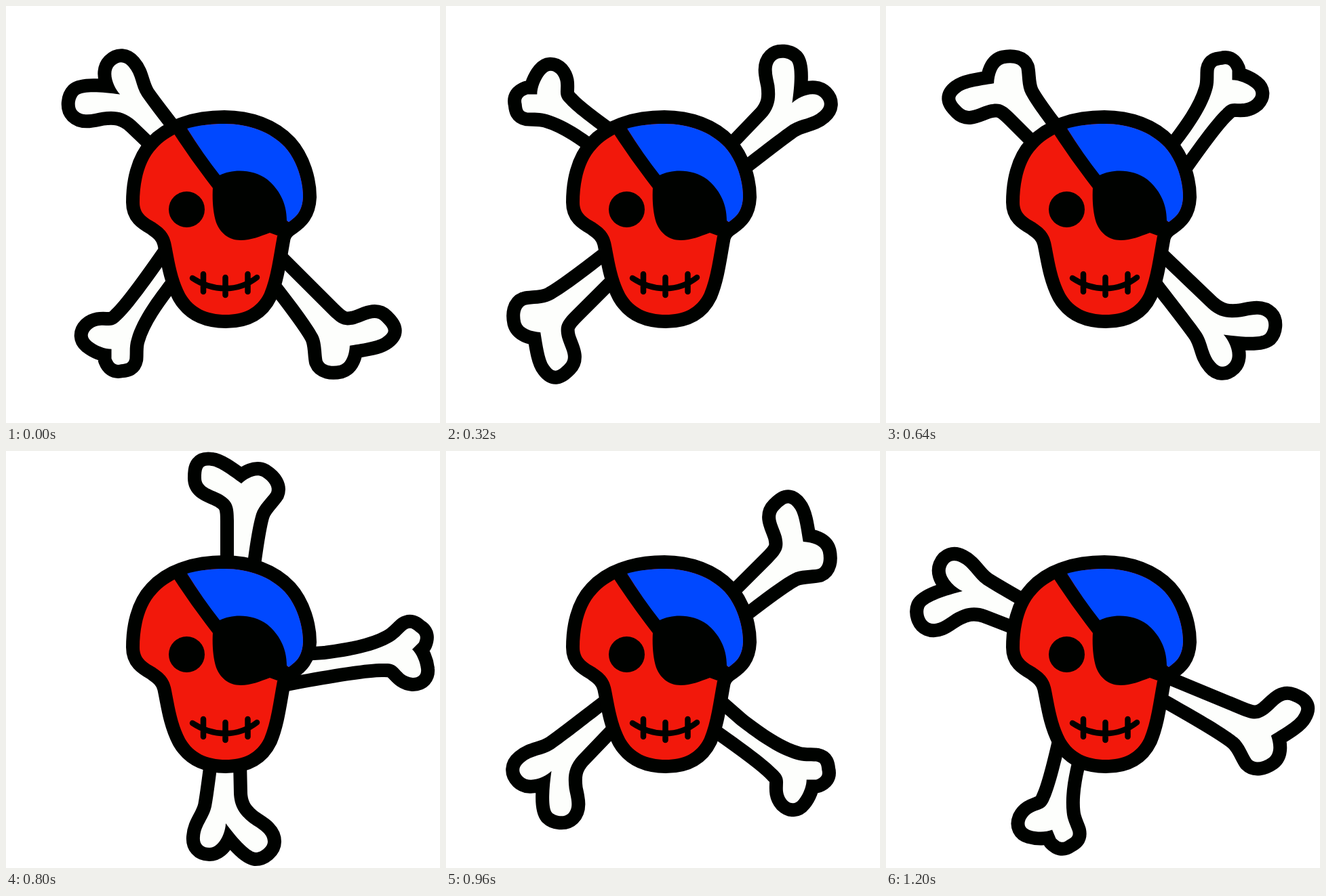
Recreate the animation shown at these times as an HTML page. Size 640 by 616 pixels, loop 1.28 s.

```html
<!DOCTYPE html>
<html lang="en">
<head>
<meta charset="utf-8">
<title>Skull and spinning bones</title>
<style>
  html, body { margin: 0; height: 100%; overflow: hidden; background: #fff; }
  svg { display: block; width: 100%; height: 100%; fill: #000200; }
  .outlined { stroke: #000200; stroke-width: 40; stroke-linejoin: round; paint-order: stroke; }
  .bone { fill: #fdfefc; }
  .stitch { fill: none; stroke: #000200; stroke-width: 8.5; stroke-linecap: round; }
</style>
</head>
<body>
<svg viewBox="0 0 640 616">
  <!-- Each bone points up from the hub, then is turned to its own angle -->
  <g id="bones">
    <path class="outlined bone" transform="rotate(-45)" d="M0,-60 L-3,-198 C-4,-220 -14,-231 -28,-242 C-38,-249 -53,-256 -53,-269 C-53,-277 -43,-285 -35,-285 C-25,-284 -6,-262 9,-242 C9,-254 18,-278 33,-278 C43,-278 48,-272 47,-262 C46,-245 34,-235 30,-217 C26,-195 22,-160 17,-122 L8,-60Z"/>
    <path class="outlined bone" transform="rotate(-135)" d="M5,-60 L0,-137 C-4,-165 -9,-205 -25,-234 C-30,-244 -38,-250 -44,-257 C-48,-263 -46,-266 -41,-272 C-37,-279 -32,-279 -25,-276 L-15,-266 C-8,-273 4,-278 14,-279 C22,-280 27,-276 27,-267 C26,-255 18,-250 12,-244 C6,-238 6,-232 6,-225 C5,-205 13,-155 23,-100 L31,-60Z"/>
    <path class="outlined bone" transform="rotate(-225)" d="M3,-60 L3,-205 C3,-228 0,-234 -14,-243 C-28,-251 -45,-253 -45,-268 C-45,-284 -43,-288 -30,-286 C-20,-285 -4,-273 14,-260 C24,-269 36,-275 45,-270 C56,-263 61,-254 58,-247 C53,-239 40,-228 36,-215 C30,-195 25,-160 17,-94 L13,-60Z"/>
  </g>

  <path class="outlined" fill="#f2180b" d="M322,174 C358,174 390,186 411,208 C430,229 438,260 438,282 C437,304 427,312 417,319 C408,325 403,330 400,340 C394,372 391,400 381,424 C370,447 350,456 324,456 C296,456 276,446 264,425 C251,400 248,372 243,349 C239,332 228,326 220,320 C206,312 197,306 197,290 C197,262 203,230 222,210 C244,186 280,174 322,174Z"/>
  <path fill="#0048ff" d="M267,181 C285,176 304,174 322,174 C358,174 390,186 411,208 C430,229 438,260 438,282 C437,304 427,312 417,319 L315,255Z"/>

  <!-- Strap, eye patch, eye -->
  <path d="M244,183 L248,189 Q274,229 305,269 L316,251 Q290,218 267,181 L262,174Z"/>
  <path d="M305,268 L315,250 C335,240 365,241 385,256 C402,270 414,290 414,317 L420,322 L400,339 L389,335 C375,340 362,346 346,346 C328,346 316,335 310,320 C305,305 304,285 305,268Z"/>
  <circle cx="266.5" cy="300.5" r="26.5"/>

  <path class="stitch" d="M275,402 C305,422 342,423 370,401 M291,396 V422 M323.5,401 V427 M356.5,396 V422"/>
</svg>
<script>
  const STEP = 80, STEPS = 16;
  const bones = document.getElementById('bones');

  function draw(now) {
    const step = Math.floor(now / STEP) % STEPS;
    bones.setAttribute('transform', `translate(333 308) rotate(${step * 360 / STEPS})`);
  }

  const start = performance.now();
  function loop() {
    draw(performance.now() - start);
    requestAnimationFrame(loop);
  }
  loop();
</script>
</body>
</html>
```
